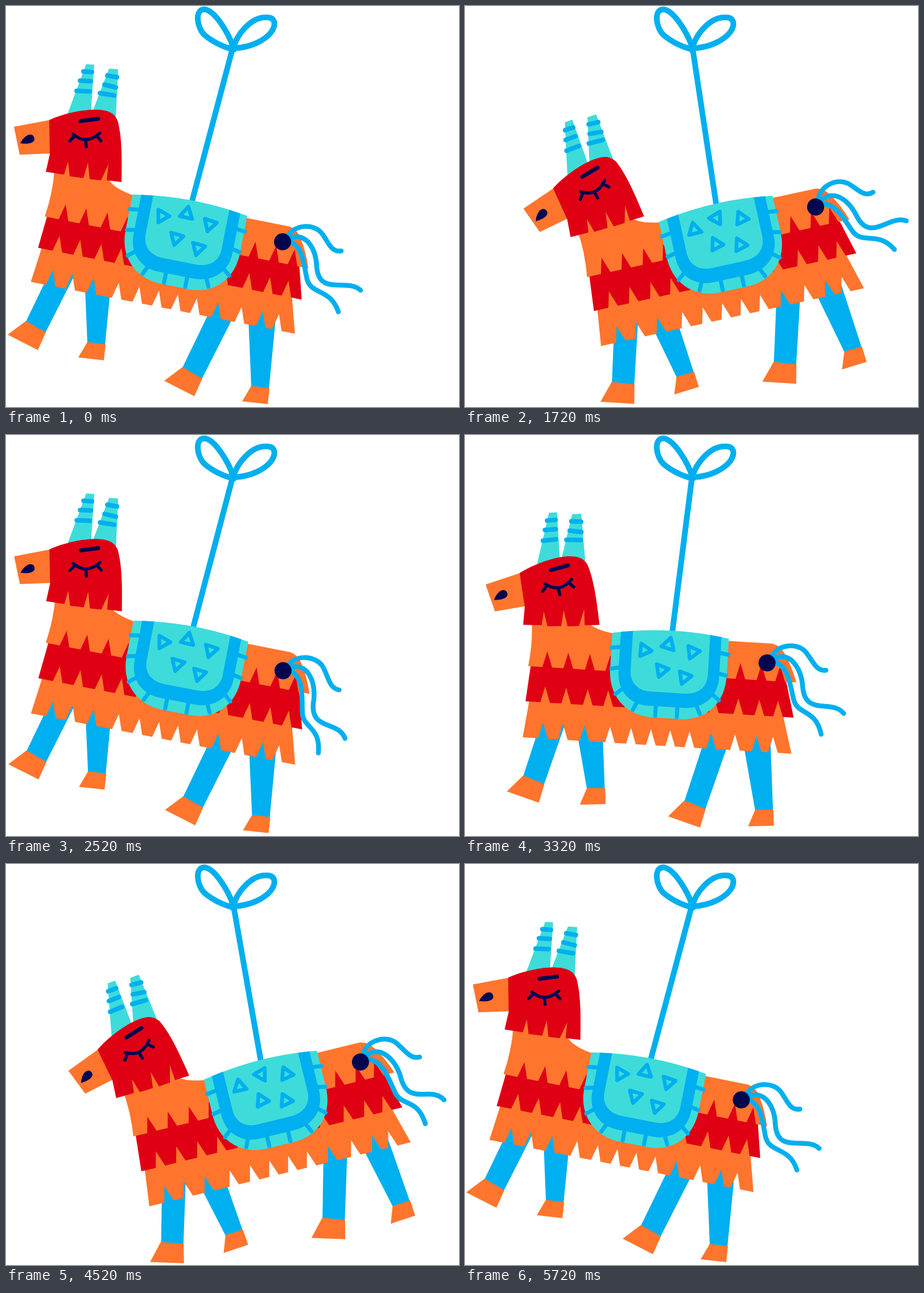
Animation, 796 px wide and 704 px high, one loop 5.76 s. Source, as an HTML page:

```html
<!DOCTYPE html>
<html lang="en">
<head>
<meta charset="utf-8">
<title>Swinging piñata</title>
<style>
  html, body { margin: 0; width: 100%; height: 100%; overflow: hidden; background: #fff; }
  svg { display: block; }
  .orange { fill: #ff752d; }
  .red { fill: #df0014; }
  .teal { fill: #3ddcda; }
  .blue { fill: #00afef; }
  .navy { fill: #00074f; }
  .line { fill: none; stroke: #00afef; stroke-linecap: round; stroke-linejoin: round; }
  .ink { fill: none; stroke: #00074f; stroke-linecap: round; }
  /* parts drawn leaning back instead of level */
  .lean { transform: rotate(-11.1deg); transform-origin: 404px 70.5px; }
</style>
</head>
<body>
<svg width="796" height="704" viewBox="0 0 796 704">
  <g id="swing">
    <g class="lean">
      <path class="line" stroke-width="10" d="M398 75L325 350"/>
      <g id="stride">
        <path class="blue" d="M92 436H139L69 574L35 554Z"/>
        <path class="orange" d="M35 553L70 573L56 604L3 577Z"/>
      </g>
      <g id="stand">
        <path class="blue" d="M137 448L188 450L174 595L143 592Z"/>
        <path class="orange" d="M143 590L175 594L172 622L127 617Z"/>
      </g>
      <use href="#stride" x="275" y="81"/>
      <use href="#stand" x="288" y="77"/>
    </g>

    <path id="low" class="orange"/>
    <path id="mid" class="red"/>
    <path id="top" class="orange"/>

    <g class="lean">
      <path class="teal" d="M141 102L155 103L149 190L106 195ZM181 110L197 111L193 195L151 188Z"/>
      <path class="line" stroke-width="8" d="M136 115L151 116M130 131L149 132M124 149L147 150M178 122L195 125M173 138L193 143M165 153L190 157"/>
      <path class="orange" d="M14 212L78 200V259L24 261Z"/>
      <path class="red" d="M76 200C105 187 140 181 160 182C182 183 191 189 196 201C203 225 204 260 203 309
        L177 306L180 278L167 306L147 304L144 275L136 302L112 299L109 273L102 296L70 291L77 260Z"/>
      <path class="navy" d="M25 241C31 229 42 222 48 228C54 237 46 244 25 241Z"/>
      <path class="ink" stroke-width="7" d="M131 202L162 198"/>
      <path class="ink" stroke-width="5.5" d="M118 225Q141 245 165 223M119 230L112 237M140 236L141 247M160 229L167 237"/>
    </g>

    <g id="blanket">
      <path class="teal" d="M276 361Q380 342 481 359V425C481 475 447 505 405 505H355C312 505 276 475 276 425Z"/>
      <path class="blue" d="M291 358.5V428C291 465 317 485 347 485H410C440 485 468 465 468 428V357L448 354.5V424C448 447 433 460 408 460H350C327 460 312 447 312 424V355.5Z"/>
      <path id="edging" class="line" stroke-width="7"/>
      <path id="patches" class="line" stroke-width="6.5"/>
    </g>

    <g class="lean">
      <path id="tail" class="line" stroke-width="8.5"/>
      <circle class="navy" cx="486" cy="414" r="15"/>
    </g>
  </g>

  <path class="line" stroke-width="10" d="M399 72C392 50 368 8 349 6C331 5 335 38 349 51C364 64 385 73 399 76M400 72C406 50 430 20 456 20C474 19 475 33 466 46C455 60 430 73 402 74"/>
  <circle class="blue" cx="399" cy="74" r="8"/>
</svg>
<script>
const el = id => document.getElementById(id);
const setPath = (id, d) => el(id).setAttribute('d', d);
const RAD = Math.PI / 180;

// Paper fringe: flat teeth hanging to y, cut by a notch at each x
const fringe = (left, right, y, notches) =>
  `L${left} ${y}` + notches.map(x => `L${x - 7} ${y}L${x} ${y - 28}L${x + 10} ${y}`).join('') + `L${right} ${y}`;

const cuts = [164, 201, 239, 275, 312, 461, 504, 541, 574];
const lowCuts = [164, 199, 237, 282, 319, 354, 388, 422, 460, 502, 540, 569];
setPath('top', `M133 312L133 345Q138 385 132 428${fringe(132, 604, 428.5, cuts)}Q594 400 582 382Q573 366 558 363L276 362Q240 356 230 343V310Z`);
setPath('mid', `M140 385L136 427${fringe(131, 603, 486, cuts)}L588 430L572 385Z`);
setPath('low', `M140 440L137 486${fringe(130, 603, 546, lowCuts)}L586 486L580 440Z`);

// Stitches on the left half of the blanket, mirrored to the right
const stitches = [[276, 387, 291, 385], [278, 424, 292, 421], [288, 468, 300, 458], [320, 494, 327, 479], [360, 502, 360, 486]];
setPath('edging', stitches.map(([x, y, u, v]) => `M${x} ${y}L${u} ${v}M${758 - x} ${y}L${758 - u} ${v}`).join(''));

// Blanket triangles: centre and resting angle
const patches = [[334, 388, -11], [376, 376, 31], [419, 386, -23], [366, 421, -25], [407, 431, -25]];
function triangle([x, y, turn], spin) {
  const corners = [0, 120, 240].map(a => {
    const r = (a + turn + spin) * RAD;
    return `${x + 13 * Math.cos(r)} ${y + 13 * Math.sin(r)}`;
  });
  return `M${corners.join('L')}Z`;
}

// Tail strands, measured from the navy ball
const strands = 'M9,-10C22,-31 54,-32 68,-16C80,-2 84,19 103,16' +
  'M11,-6C44,-19 59,16 60,44C64,96 114,63 137,85' +
  'M11,-2C38,10 37,41 43,66C51,94 84,81 98,123';
// Each point turns about the ball, further out turning more
function bend(amount) {
  return strands.replace(/(-?\d+),(-?\d+)/g, (_, x, y) => {
    const r = Math.hypot(x, y), a = Math.atan2(y, x) + 0.115 * r * amount * RAD;
    return `${486 + r * Math.cos(a)},${414 + r * Math.sin(a)}`;
  });
}

// Goes 0 -> 1 -> 0 with cubic easing; it is 0 at `start`, 1 after `half` ms
function sway(t, start, half) {
  const phase = ((t - start) / half + 20) % 2;
  const x = phase > 1 ? 2 - phase : phase;
  return x < 0.5 ? 4 * x ** 3 : 1 - 4 * (1 - x) ** 3;
}

const move = (id, y) => el(id).setAttribute('transform', `translate(0 ${y})`);

function draw(t) {
  const swing = sway(t, -160, 1440);
  el('swing').setAttribute('transform', `rotate(${11.25 - 26.7 * swing} 404 70.5)`);
  setPath('patches', patches.map(p => triangle(p, 45 * swing)).join(''));
  setPath('tail', bend(sway(t, -40, 960)));

  const lift = 0.2 - 5.8 * sway(t, 40, 480);
  move('top', lift);
  move('blanket', lift);
  move('mid', -2.2 + 2.8 * sway(t, 220, 480));
  move('low', -0.8 + 4.4 * sway(t, 160, 480));
}

const begin = performance.now();
function tick() {
  draw((performance.now() - begin) % 5760);
  requestAnimationFrame(tick);
}
tick();
</script>
</body>
</html>
```
